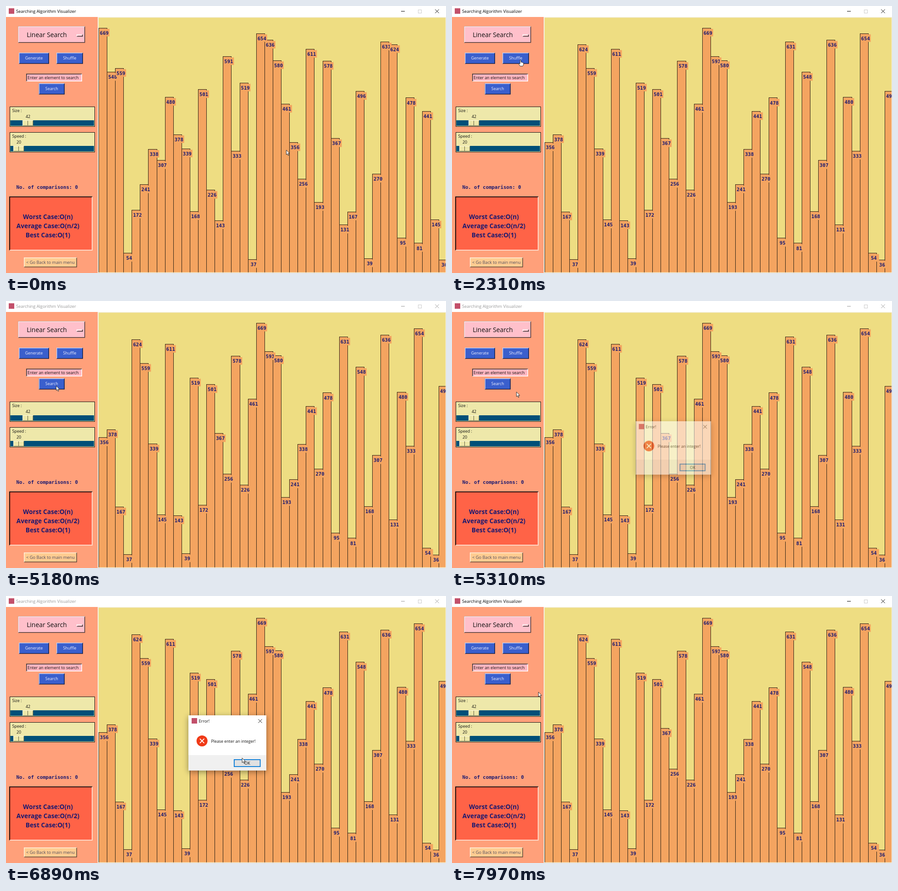
An HTML page with a canvas for the animation above (8000 ms loop, 960 by 584 pixels).

```html
<!DOCTYPE html>
<html lang="en">
<head>
<meta charset="utf-8">
<title>Searching Algorithm Visualizer</title>
<style>
html, body { margin: 0; width: 100%; height: 100%; overflow: hidden; background: #fff; }
canvas { display: block; }
</style>
</head>
<body>
<canvas id="stage" width="960" height="584"></canvas>
<script>
const LOOP = 8000;
const UI = '"Open Sans", "Noto Sans", sans-serif';
const MONO = '"DejaVu Sans Mono", "Noto Sans Mono", monospace';
const NAVY = '#191970', SALMON = '#ffa07a', BAR = '#f4a460', KHAKI = '#eedd82', BLUE = '#3a5fcd';
const LOGO = '#c2506a';

const before = [669, 548, 559, 54, 172, 241, 338, 307, 480, 378, 339, 168, 501, 226,
  143, 591, 333, 519, 37, 654, 636, 580, 461, 356, 256, 611, 193, 578,
  367, 131, 167, 496, 39, 270, 631, 624, 95, 478, 81, 441, 145, 36];
const after = [356, 378, 167, 37, 624, 559, 339, 145, 611, 143, 39, 519, 172, 501,
  367, 256, 578, 226, 461, 669, 591, 580, 193, 241, 338, 441, 270, 478,
  95, 631, 81, 548, 168, 307, 636, 131, 480, 333, 654, 54, 36, 496];

// Pointer moves: start, end, steps, target x, target y
const START = [611.5, 315];
const MOVES = [
  [290, 440, 4, 314, 235],
  [720, 1000, 7, 199, 159],
  [1240, 1590, 9, 162, 125],
  [1640, 1770, 4, 149.5, 118],
  [3790, 4060, 7, 136.5, 151],
  [4210, 4900, 14, 109.5, 185.5],
  [5230, 5640, 10, 409, 314],
  [5870, 6050, 5, 485.5, 325],
  [6290, 7070, 17, 520, 359],
  [7360, 7640, 7, 216, 227],
  [7920, 7970, 2, 188.5, 210]
];

const stage = document.getElementById('stage');
const main = stage.getContext('2d');
const sheet = document.createElement('canvas');
sheet.width = 200;
sheet.height = 150;
let g = main;

const clamp = v => Math.max(0, Math.min(1, v));
const ease = p => p * p * (3 - 2 * p);

function box(x, y, w, h, fill) {
  g.fillStyle = fill;
  g.fillRect(x, y, w, h);
}

function frame(x, y, w, h, color, width = 1) {
  g.strokeStyle = color;
  g.lineWidth = width;
  g.strokeRect(x + width / 2, y + width / 2, w - width, h - width);
}

function line(color, width, ...pts) {
  g.strokeStyle = color;
  g.lineWidth = width;
  g.beginPath();
  for (let i = 0; i < pts.length; i += 2) g.lineTo(pts[i], pts[i + 1]);
  g.stroke();
}

function cross(x, y, r, color, width) {
  line(color, width, x - r, y - r, x + r, y + r);
  line(color, width, x - r, y + r, x + r, y - r);
}

// y is the middle of the capitals
function text(str, x, y, size, color, align = 'left', font = UI, weight = 400) {
  g.font = `${weight} ${size}px ${font}`;
  g.fillStyle = color;
  g.textAlign = align;
  g.fillText(str, x, y + size * 0.36);
}

// Bevelled panel: light and dark edges
function bevel(x, y, w, h, fill, light, dark, width = 1.5) {
  box(x, y, w, h, dark);
  g.fillStyle = light;
  g.beginPath();
  g.moveTo(x, y);
  g.lineTo(x + w, y);
  g.lineTo(x + w - width, y + width);
  g.lineTo(x + width, y + h - width);
  g.lineTo(x, y + h);
  g.fill();
  box(x + width, y + width, w - 2 * width, h - 2 * width, fill);
}

function button(label, x, y, w, h, down) {
  const [light, dark] = down ? ['#101c40', '#b9c6ee'] : ['#c3cdec', '#15224d'];
  bevel(x, y, w, h, BLUE, light, dark);
  const d = down ? 1 : 0;
  text(label, x + w / 2 + d, y + h / 2 + d, 8.9, '#f0f0ff', 'center');
}

function slider(label, value, y, thumb) {
  box(8, y, 186, 44, '#eee8aa');
  frame(8, y, 186, 44, '#111');
  text(label, 13.5, y + 8.5, 8.9, '#111');
  text(value, thumb + 12, y + 22, 8.9, '#111', 'center');
  box(9.5, y + 30, 182.5, 12, '#004f78');
  bevel(thumb, y + 30, 23.5, 12, '#eee8aa', '#fffbe0', '#5f5c44', 1);
  line('#5f5c44', 1, thumb + 11.5, y + 31, thumb + 11.5, y + 41);
}

function titleBar(active) {
  const ink = active ? '#000' : '#999';
  box(0, 0, 960, 24, '#fff');
  box(6, 5, 12, 12, LOGO);
  text('Searching Algorithm Visualizer', 22, 11.5, 9.27, ink);
  line(ink, 1, 862, 11.5, 870, 11.5);
  frame(899, 8, 8, 8, '#ccc');
  cross(940.5, 11.5, 4, ink, 1);
}

function sidebar(t) {
  box(0, 24, 200, 560, SALMON);
  bevel(26.5, 44.5, 146, 36, '#ffc0cb', '#fff0f3', '#4a3a3d');
  text('Linear Search', 89, 63, 13.9, '#111', 'center');
  bevel(154, 62, 13.5, 5, '#ffc0cb', '#fff', '#222', 1.3);

  button('Generate', 28, 102, 66, 24.5);
  button('Shuffle', 110, 102, 58, 24.5, t >= 1920 && t < 2150);
  bevel(44, 148, 122, 17, '#ffb6c1', '#333', '#fff');
  text('Enter an element to search', 47, 156.5, 8.9, '#111');
  button('Search', 71.5, 169, 56.5, 24.5, t >= 4900 && t < 5130);

  slider('Size :', '42', 220, 36);
  slider('Speed :', '20', 276, 16);

  const noun = t >= 2200 && t < 5130 ? 'comparison' : 'comparisons';
  text(`No. of ${noun}: 0`, 22.5, 396.5, 10.65, NAVY, 'left', MONO, 700);

  bevel(7, 416.5, 182, 118.5, '#ff6347', '#1a0a08', '#ffd9c8', 2);
  ['Worst Case:O(n)', 'Average Case:O(n/2)', 'Best Case:O(1)'].forEach((s, i) =>
    text(s, 91.5, 461 + 20 * i, 13.7, NAVY, 'center', UI, 700));

  bevel(39, 550, 116, 21.5, '#ffcc91', '#fff1dd', '#5c4a38');
  text('< Go Back to main menu', 97, 560.5, 9.25, '#4a4a5e', 'center');
}

function chart(values) {
  box(200, 24, 760, 560, '#f4f1e4');
  box(202, 25.5, 757, 557, KHAKI);
  g.save();
  g.beginPath();
  g.rect(201, 25, 758, 557.5);
  g.clip();
  const left = i => Math.round(201.8 + 18.1 * i);
  const top = v => 48.5 + (669 - v) * 0.801;
  values.forEach((v, i) => {
    const x = left(i), y = Math.round(top(v));
    box(x, y, left(i + 1) - x, 600 - y, BAR);
    g.strokeStyle = '#2b2114';
    g.lineWidth = 1;
    g.strokeRect(x + 0.5, y - 0.5, left(i + 1) - x, 600 - y);
  });
  // Labels lie above all bars, later ones on top
  values.forEach((v, i) => {
    const x = 201.8 + 18.1 * i, y = top(v);
    box(x + 1.5, y + 1.5, 22.5, 16.5, BAR);
    text(v, x + 12.6, y + 10.2, 10.65, NAVY, 'center', MONO, 700);
  });
  g.restore();
}

// Drawn on its own sheet so it fades as one piece
function dialog(t) {
  let alpha = clamp((t - 5200) / 200);
  let scale = 0.92 + 0.08 * ease(alpha);
  if (t > 7260) {
    alpha = 1 - clamp((t - 7260) / 180);
    scale = 0.96 + 0.04 * alpha;
  }
  if (t < 5200 || alpha <= 0) return;

  g = sheet.getContext('2d');
  g.clearRect(0, 0, 200, 150);
  g.save();
  g.translate(15 - 398, 12 - 261);
  g.shadowColor = 'rgba(0,0,0,.4)';
  g.shadowBlur = 12;
  g.shadowOffsetY = 3;
  box(398, 261, 170, 120.5, '#fff');
  g.shadowColor = 'transparent';
  box(398, 348, 170, 33.5, '#f0f0f0');
  box(405, 267, 12, 12, LOGO);
  text('Error!', 420.5, 273.5, 9, '#111');
  cross(554.5, 273.5, 4, '#111', 1);

  g.fillStyle = '#f03a17';
  g.beginPath();
  g.arc(427.7, 317, 12, 0, 7);
  g.fill();
  cross(427.7, 317, 4.8, '#fff', 1.8);
  text('Please enter an integer!', 447.5, 317.5, 8.8, '#111');

  const hover = t >= 7000, down = t >= 7120;
  box(497, 357, 58.5, 17, down ? '#cce4f7' : hover ? '#e5f1fb' : '#e1e1e1');
  frame(497, 357, 58.5, 17, down ? '#005499' : '#0078d7', hover ? 1.2 : 1.8);
  text('OK', 526.5, 365.5, 8.9, '#111', 'center');
  g.restore();
  g = main;

  g.save();
  g.globalAlpha = alpha;
  g.translate(483, 321);
  g.scale(scale, scale);
  g.drawImage(sheet, -100, -72);
  g.restore();
}

function pointerAt(t) {
  let [x, y] = START;
  for (const [a, b, n, tx, ty] of MOVES) {
    if (t < a) break;
    const k = Math.min(n, Math.floor((t - a) / (b - a) * (n - 1) + 1e-6) + 1);
    const p = ease(k / n);
    x += (tx - x) * p;
    y += (ty - y) * p;
  }
  return [x, y];
}

function shape(path) {
  const p = new Path2D(path);
  g.fillStyle = '#fff';
  g.fill(p);
  g.strokeStyle = '#222';
  g.lineWidth = 0.9;
  g.lineJoin = 'round';
  g.stroke(p);
}

function pointer(t) {
  const [x, y] = pointerAt(t);
  const inside = (l, u, r, d) => x >= l && x <= r && y >= u && y <= d;
  g.save();
  g.translate(x, y);
  if (t < 5130 && (inside(110, 102, 168, 124) || inside(72, 169, 128, 193))) {
    shape('M-1.2 .8Q0-.5 1 .8V5Q2.4 4.2 3 5.4Q4.4 4.8 5 6Q6.5 5.6 6.5 7.3V10L5 13.5H-.8L-3.8 9Q-4-.2 -1.2 9Z'
      .replace('Q-4-.2 -1.2 9', 'Q-3.6 7 -1.2 8.4'));
  } else if (inside(44, 148, 166, 165)) {
    line('#222', 1, 0, -5, 0, 5);
    line('#222', 1, -2.5, -5, 2.5, -5);
    line('#222', 1, -2.5, 5, 2.5, 5);
  } else {
    shape('M0 0V10.2L2.3 8.2L4 12L5.6 11.3L4 7.6H7.2Z');
  }
  g.restore();
}

function draw(t) {
  titleBar(t < 5130 || t >= 7240);
  sidebar(t);
  chart(t < 2200 ? before : after);
  dialog(t);
  pointer(t);
}

const began = performance.now();
function tick() {
  draw((performance.now() - began) % LOOP);
  requestAnimationFrame(tick);
}
tick();
</script>
</body>
</html>
```
